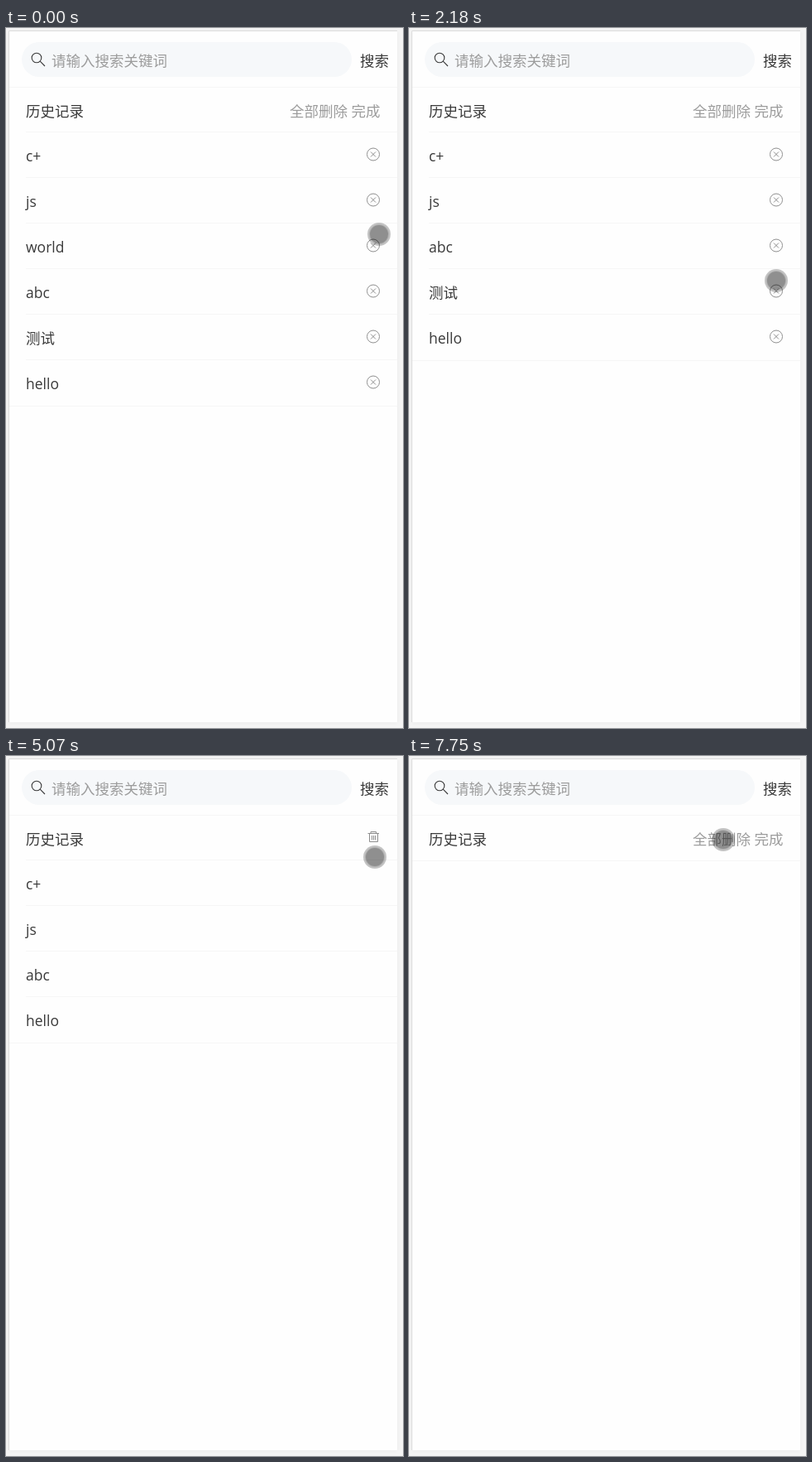
These frames come from a looping animation (480x845 px, 8 s). An HTML page:

```html
<!DOCTYPE html>
<html lang="zh-CN">
<head>
<meta charset="utf-8">
<title>历史记录</title>
<style>
  html, body { margin: 0; width: 100%; height: 100%; overflow: hidden; background: #f5f5f5; }
  svg { display: block; }
  text { font: 17.5px "Open Sans", "Noto Sans CJK SC", "Noto Sans CJK", sans-serif; fill: #3a3a3a; }
  .muted { fill: #9c9c9c; }
  .rule { fill: #f6f6f6; }
  .icon { fill: none; stroke: #8e8e8e; }
  .page { fill: #fefefe; filter: drop-shadow(0 1px 3px rgba(0, 0, 0, .04)); }
</style>
</head>
<body>
<svg width="480" height="845" viewBox="0 0 480 845">
  <defs>
    <symbol id="remove" viewBox="-9 -9 18 18">
      <circle class="icon" r="7.5"/>
      <path class="icon" d="M-3-3 3 3M3-3-3 3"/>
    </symbol>
  </defs>

  <rect class="page" x="3" y="3" width="470" height="835"/>
  <path d="M473 3.5H3.5V838" fill="none" stroke="#dcdcdc"/>

  <rect x="19" y="17" width="399" height="42" rx="21" fill="#f6f8fa"/>
  <g fill="none" stroke="#3a3a3a" stroke-width="1.1">
    <circle cx="37" cy="36" r="5.8"/>
    <path d="M41.2 40.2 47 46"/>
  </g>
  <text class="muted" x="55" y="45.5">请输入搜索关键词</text>
  <text x="428" y="45.5">搜索</text>
  <rect class="rule" x="4" y="71" width="469" height="1"/>
  <text x="24" y="106.5">历史记录</text>

  <text id="actions" class="muted" x="343" y="106.5">全部删除 完成</text>
  <g id="trash" class="icon">
    <path d="M437.5 93.5H451M441 93V91.5H447.5V93M439.5 94V103.5H449.5V94"/>
    <path d="M442.5 96V101.5M444.5 96V101.5M446.5 96V101.5"/>
  </g>
  <g id="list"></g>

  <g id="cursor">
    <circle r="14" fill="#000" fill-opacity=".23"/>
    <circle r="12" fill="#000" fill-opacity=".1"/>
    <circle r="11" fill="#000" fill-opacity=".18"/>
  </g>
</svg>

<script>
const LOOP = 8000, ROW = 55, TICK = 77, HOLD = 150;
const $ = id => document.getElementById(id);

const words = ['c+', 'js', 'world', 'abc', '测试', 'hello'];

// Release time of each click
const click = { world: 1090, 测试: 3030, done: 4590, edit: 5900, clear: 7750 };

// Each move curves from the previous resting place: start, end, bend, target
const home = [451, 249];
const moves = [
  [70, 770, [362, 256], [444, 264]],
  [1560, 1640, [442, 263], [441, 263]],
  [1790, 2330, [440, 290], [447, 319]],
  [3580, 4370, [474, 114], [443, 107]],
  [4430, 4430, [443, 98], [443, 98]],
  [5070, 5070, [446, 122], [446, 122]],
  [5145, 5745, [490, 115], [447, 99]],
  [6280, 6970, [426, 122], [380, 101]],
];

// The pointer advances in even ticks along each curve.
function pointerAt(t) {
  let at = home;
  for (const [start, end, bend, target] of moves) {
    if (t < start) break;
    const steps = Math.round((end - start) / TICK) + 1;
    const p = Math.min(1, Math.floor((t - start) / TICK + 1.2) / steps), q = 1 - p;
    at = at.map((from, i) => Math.round(q * q * from + 2 * p * q * bend[i] + p * p * target[i]));
  }
  return at;
}

function rule(index, last) {
  const x = last ? 4 : 24;
  const y = 125 + ROW * index + (last ? 1 : 0);
  return `<rect class="rule" x="${x}" y="${y}" width="${473 - x}" height="1"/>`;
}

function row(word, i, editing) {
  const icon = `<use href="#remove" x="435" y="${143.5 + ROW * i}" width="18" height="18"/>`;
  return `<text x="24" y="${161 + ROW * i}">${word}</text>` + (editing ? icon : '');
}

function showList(t) {
  const editing = t < click.done || t >= click.edit;
  const rows = words.filter(word => t < (click[word] ?? click.clear) && t < click.clear);
  $('actions').style.display = editing ? '' : 'none';
  $('trash').style.display = editing ? 'none' : '';
  $('list').innerHTML = rule(0, !rows.length) + rows.map((word, i) =>
    row(word, i, editing) + rule(i + 1, i + 1 === rows.length)).join('');
}

const clicks = Object.values(click);
const origin = performance.now();
let shown;

function draw() {
  const t = (performance.now() - origin) % LOOP;
  const passed = clicks.filter(time => time <= t).length;
  if (passed !== shown) {
    showList(t);
    shown = passed;
  }
  const [x, y] = pointerAt(t);
  const down = clicks.some(time => t >= time - HOLD && t < time);
  $('cursor').setAttribute('transform', down
    ? `translate(${x - 1} ${y - 1}) scale(${15 / 14})`
    : `translate(${x} ${y})`);
  requestAnimationFrame(draw);
}
draw();
</script>
</body>
</html>
```
